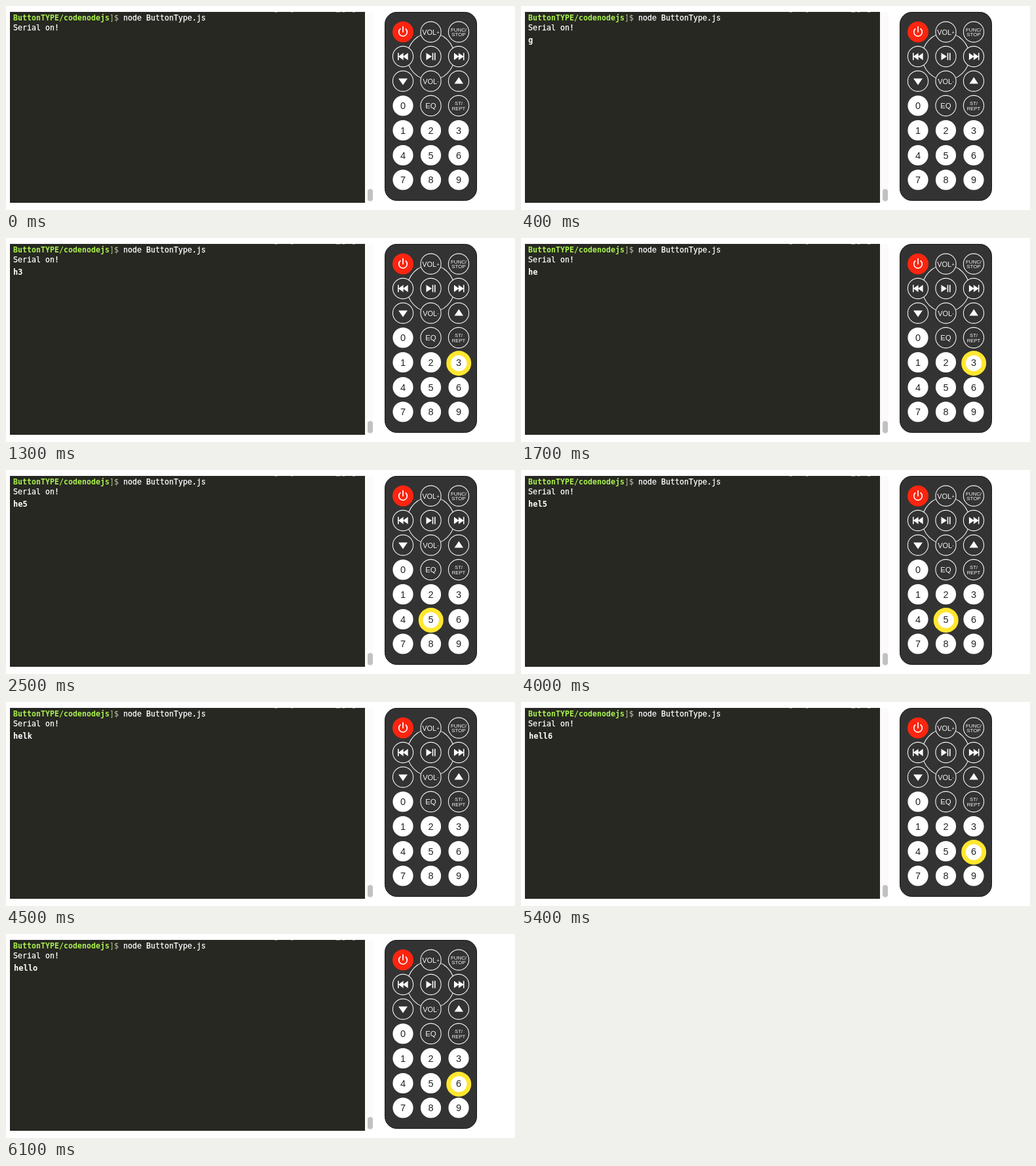
An HTML page for the animation above (8.1 s loop, 777 px wide and 311 px high).

```html
<!DOCTYPE html>
<html lang="en">
<head>
<meta charset="utf-8">
<title>Remote keypad typing</title>
<style>
  html, body { margin: 0; width: 100%; height: 100%; overflow: hidden; background: #fff; }
  svg { display: block; width: 777px; height: 311px; }
  text { white-space: pre; }
  .term { font: 11.63px "DejaVu Sans Mono", monospace; fill: #fff; stroke: #fff; stroke-width: .25; }
  .path { font-weight: bold; fill: #a9f04e; stroke: none; }
  .typed { font: bold 12px "DejaVu Sans Mono", monospace; fill: #fff; }
  .label { font-family: "Liberation Sans", Arial, sans-serif; text-anchor: middle; fill: #f4f4f4; }
  .digit { font-size: 14.5px; fill: #222; }
  .ring { fill: #333; stroke: #f4f4f4; stroke-width: 1.1; }
  .icon { fill: #fff; }
</style>
</head>
<body>
<svg viewBox="0 0 777 311">
  <!-- terminal -->
  <rect x="6" y="9" width="542" height="291" fill="#272822"/>
  <path d="M410 9.5h4M435 9.5h3M504 9.5h6M514 9.5h3M529 9.5h4" stroke="#77786f"/>
  <rect x="548" y="9" width="13" height="291" fill="#fdfafb"/>
  <rect x="552" y="279" width="8" height="18.5" rx="4" fill="#c1c1c1"/>
  <text class="term" x="11" y="22"><tspan class="path">ButtonTYPE/codenodejs</tspan><tspan fill="#b9c274" stroke="none">]</tspan><tspan fill="#c3cfbf" stroke="none">$</tspan> node ButtonType.js</text>
  <text class="term" x="11" y="37">Serial on!</text>
  <text class="typed" id="typed" x="11" y="56"></text>

  <!-- remote -->
  <rect x="578.5" y="9.5" width="140" height="287" rx="18" fill="#333" stroke="#161616"/>
  <circle cx="648.5" cy="77" r="36" class="ring"/>
  <g id="keys"></g>
  <circle cx="606" cy="39.5" r="16" fill="#fc2510"/>
  <path d="M601.9 34.9a6.3 6.3 0 1 0 8.2 0M606 31.5v8" fill="none" stroke="#fff" stroke-width="1.7" stroke-linecap="round"/>
  <g class="icon">
    <path id="skip" d="M598 71.5h1.6v5l7-5v5l7-5v11l-7-5v5l-7-5v5h-1.6z"/>
    <use href="#skip" transform="matrix(-1 0 0 1 1297.5 0)"/>
    <path d="M641.5 71.5l8.5 5.5l-8.5 5.5zM650.7 71.5h1.6v11h-1.6zM654 71.5h1.6v11h-1.6z"/>
    <path d="M599 110.5h14l-7 10zM684.5 118.5h13.5l-6.7-10z"/>
  </g>
  <g class="label">
    <g font-size="11">
      <text x="648.5" y="43.5">VOL<tspan font-size="8" dy="-1">+</tspan></text>
      <text x="648.5" y="118.5">VOL<tspan font-size="8" dy="-2">-</tspan></text>
      <text x="648.5" y="156.2" font-size="11.5">EQ</text>
    </g>
    <g font-size="7.9">
      <text x="691" y="38.8">FUNC/</text>
      <text x="691" y="46.3">STOP</text>
    </g>
    <g font-size="7.7">
      <text x="691" y="150.5">ST/</text>
      <text x="691" y="158.8">REPT</text>
    </g>
  </g>
  <circle id="glow" r="15.6" fill="none" stroke="#ffe72f" stroke-width="6.8" visibility="hidden"/>
  <g id="digits" class="label digit"></g>
</svg>
<script>
  const LOOP = 8100, PULSE = 100, REPEAT = 200;
  const cols = [606, 648.5, 691];
  const rows = [39.5, 77, 114.5, 152, 189.5, 227.5, 265];
  const $ = id => document.getElementById(id);

  function add(parent, tag, attrs, text = "") {
    const el = document.createElementNS("http://www.w3.org/2000/svg", tag);
    for (const name in attrs) el.setAttribute(name, attrs[name]);
    el.textContent = text;
    parent.append(el);
  }

  function keyPos(n) {
    return n ? [cols[(n - 1) % 3], rows[4 + Math.floor((n - 1) / 3)]] : [cols[0], rows[3]];
  }

  rows.slice(0, 4).forEach((cy, r) => cols.forEach((cx, c) => {
    if (c || (r && r < 3)) add($("keys"), "circle", { cx, cy, r: 15.6, class: "ring" });
  }));
  for (let n = 0; n <= 9; n++) {
    const [x, y] = keyPos(n);
    add($("keys"), "circle", { cx: x, cy: y, r: 15.6, fill: "#fff" });
    add($("digits"), "text", { x, y: y + 5.1 }, n);
  }

  // Each press cycles the digit and its letters; the last press may stay held.
  const taps = [
    { at: 100, key: 4, letters: "gh", hold: true },
    { at: 1300, key: 3, letters: "de", hold: true },
    { at: 2500, key: 5, letters: "jkl" },
    { at: 4000, key: 5, letters: "jkl", hold: true },
    { at: 5400, key: 6, letters: "mno", hold: true, pause: 100 }
  ];

  const steps = [{ at: 0, text: "", x: 11 }];
  let done = "";
  for (const { at, key, letters, hold, pause = 0 } of taps) {
    const chars = key + letters, last = chars.length - 1;
    const x = key === 6 ? 12 : 11;
    [...chars].forEach((ch, i) => {
      const start = at + i * REPEAT + (i === last ? pause : 0);
      const text = done + ch;
      steps.push({ at: start, text, x, key });
      if (i < last || !hold) steps.push({ at: start + PULSE, text, x });
    });
    done += chars[last];
  }

  let shown;
  function draw(step) {
    if (step === shown) return;
    shown = step;
    $("typed").textContent = step.text;
    $("typed").setAttribute("x", step.x);
    $("glow").setAttribute("visibility", step.key ? "visible" : "hidden");
    if (step.key) {
      const [x, y] = keyPos(step.key);
      $("glow").setAttribute("cx", x + .2);
      $("glow").setAttribute("cy", y + 1.4);
    }
  }

  function tick() {
    const t = performance.now() % LOOP;
    draw(steps.findLast(s => s.at <= t));
    requestAnimationFrame(tick);
  }
  tick();
</script>
</body>
</html>
```
